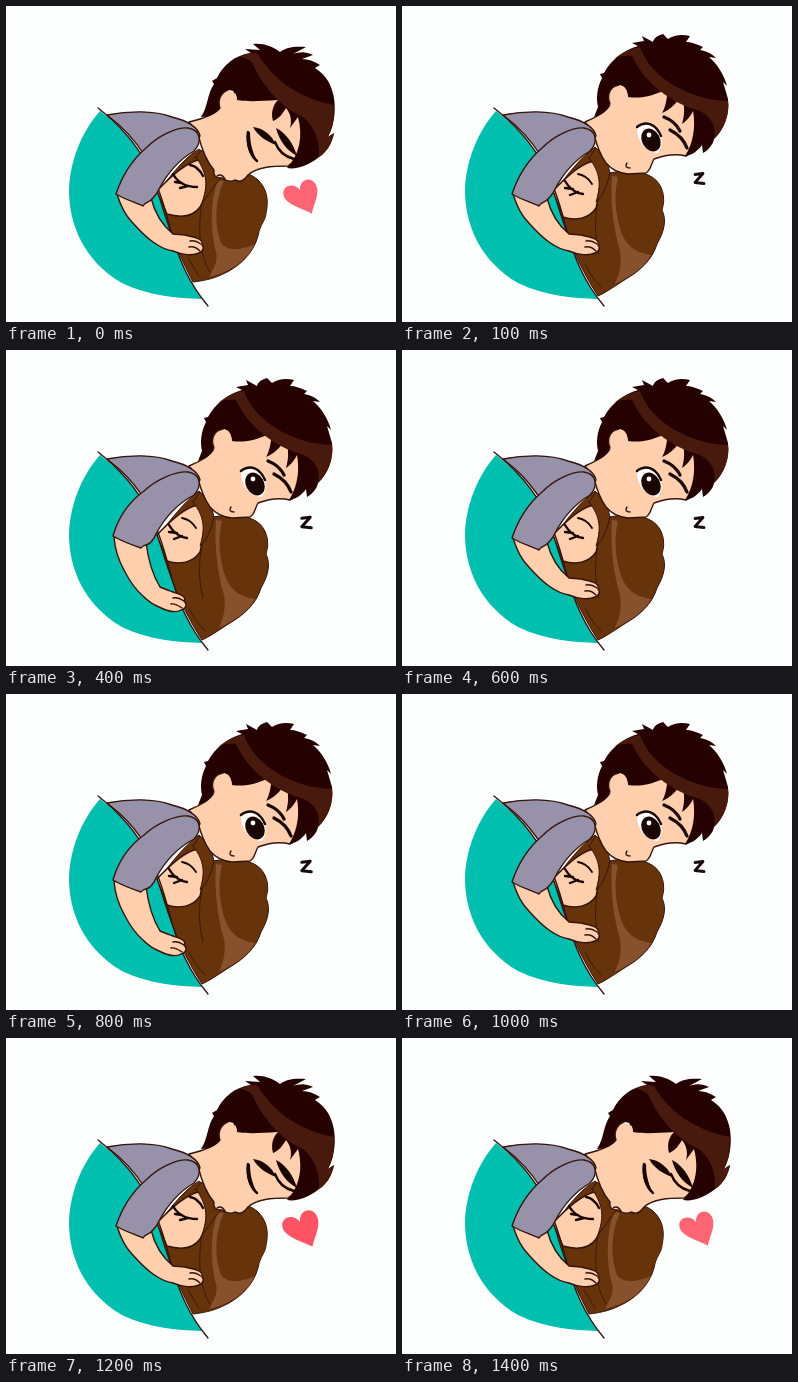
Recreate the animation shown at these times as an HTML page. Size 390x316 px, loop 1500 ms.

```html
<!DOCTYPE html>
<html lang="en">
<head>
<meta charset="utf-8">
<title>Sleepy hug</title>
<style>
html, body { margin: 0; width: 100%; height: 100%; overflow: hidden; background: #fdfefe; }
svg { display: block; width: 390px; height: 316px; }
path { stroke-linejoin: round; stroke-linecap: round; }
.line { fill: none; stroke: #35140c; stroke-width: 1.4; }
.skin { fill: #ffcfae; stroke: #35140c; stroke-width: 1.4; }
.flesh { fill: #ffcfae; }
.shirt { fill: #9792aa; stroke: #35140c; stroke-width: 1.4; }
.hair { fill: #250101; }
.shine { fill: #481a0d; }
.brown { fill: #66330b; stroke: #35140c; stroke-width: 1; }
.streak { fill: #87512e; }
.ink { fill: #190605; }
.lash { fill: none; stroke: #190605; stroke-width: 2.4; }
</style>
</head>
<body>
<svg viewBox="0 0 390 316">
  <path fill="#00bfae" d="M94 105C76 125 63 156 63 187C64 229 87 261 116 277C143 290 170 292 196 293C180 268 172 250 163 218C152 175 138 138 94 105Z"/>

  <g id="girlRest">
    <path class="brown" d="M152 186C166 168 178 152 193 141C200 147 205 156 207 167C222 164 240 165 250 171C261 178 264 192 260 204C265 214 262 226 255 238C250 255 236 266 224 273C213 280 203 287 196 290C179 264 168 238 158 207Z"/>
    <path class="streak" d="M210 170C208 198 212 225 218 245C220 256 218 267 213 278L226 271C236 265 244 258 249 249C234 247 223 240 218 222C213 205 212 188 216 171Z"/>
    <path class="brown" style="stroke:none" d="M217 172C212 190 214 212 220 227C226 242 238 246 250 245C261 230 264 214 260 204C264 190 259 177 249 171Z"/>
    <path class="line" style="stroke-width:.8" d="M183 258C188 268 193 275 199 281M196 195C192 215 193 232 197 248"/>
    <path class="skin" d="M151 185C164 171 176 160 188 156C196 155 200 158 202 164C197 177 197 190 194 202C187 213 173 215 161 211Z"/>
    <path class="brown" d="M187 152L194 142C201 148 206 157 208 167C205 180 201 190 194 196C199 180 199 167 187 152Z"/>
    <path class="lash" d="M163 175C168 184 174 187 181 188M163 182L171 183M168 189L176 186"/>
    <path class="lash" style="stroke-width:1.9" d="M176 168C182 169 187 173 190 178"/>
  </g>
  <g id="girlKiss">
    <path class="brown" d="M152 186C166 168 178 152 193 143C200 148 206 158 210 168C226 163 241 165 251 173C261 182 263 194 260 207C260 214 254 218 252 230C247 249 231 262 217 268C207 273 196 275 187 276C176 255 166 232 158 207Z"/>
    <path class="streak" d="M212 174C204 195 204 224 210 246C212 253 209 261 203 271L216 267C233 260 242 251 249 238C233 245 221 245 215 237C208 218 209 196 218 175Z"/>
    <path class="brown" style="stroke:none" d="M218 175C209 195 209 215 215 233C222 243 238 242 250 234C254 218 260 214 260 207C262 194 260 182 250 174Z"/>
    <path class="line" style="stroke-width:.8" d="M196 197C191 224 194 251 204 266M182 252L193 270"/>
    <path class="skin" d="M151 185C164 171 178 158 192 154C203 158 210 166 209 174C203 182 199 191 194 201C187 211 175 212 161 208Z"/>
    <path class="brown" d="M190 151L195 144C204 152 211 163 214 173C207 181 202 190 196 197C201 181 203 170 190 151Z"/>
    <path class="lash" d="M167 168C172 177 180 181 191 181M169 176L176 177M174 182L182 180M184 159C190 160 194 164 197 170"/>
  </g>

  <g id="headRest">
    <path class="skin" d="M183 116C198 110 206 103 209 98L222 76C250 58 290 75 301 110C299 132 294 145 284 150C272 147 260 150 252 153C249 158 249 164 244 167L226 168C216 167 209 163 204 157C199 150 195 141 192 128Z"/>
    <path class="hair" d="M192 111C201 109 206 104 208 98C204 88 209 80 217 79C223 79 225 84 226 91C238 93 253 90 266 82C265 91 264 101 260 107C269 103 275 97 279 89C283 98 283 108 280 118C286 114 289 109 291 105C294 121 291 138 283 150C290 149 296 145 300 139L301 147C307 144 311 138 312 133C322 124 328 108 326 93L321 76L325 80C322 68 315 58 307 51L314 52C309 47 304 45 298 44L301 41C295 38 289 36 284 36L288 30C280 28 272 29 266 33L261 28C255 30 252 32 251 36L240 30L242 35L230 37L236 40C222 44 209 54 202 67L198 68L200 72C195 82 194 92 196 101Z"/>
    <path class="shine" d="M212 53C221 46 230 42 238 41C248 70 285 94 326 95C328 108 322 124 312 133C315 120 309 111 298 105C268 97 242 76 230 50C224 49 217 50 212 53Z"/>
    <path class="flesh" d="M208 99C205 88 210 80 217 79C223 80 226 85 226 92L222 109L209 109Z"/>
    <path class="line" d="M208 98C204 88 209 80 217 79"/>
    <path fill="#fff" d="M235 122C240 116 249 116 255 122C261 130 261 141 256 147C246 147 235 137 235 122Z"/>
    <ellipse class="ink" cx="249" cy="134" rx="9" ry="12" transform="rotate(-28 249 134)"/>
    <circle cx="247" cy="129" r="2.4" fill="#fff"/>
    <path class="lash" d="M235 121C244 114 254 118 259 130"/>
    <path class="lash" style="stroke-width:3.2" d="M262 111C270 114 275 119 278 125M268 124C276 128 282 134 285 142"/>
    <path class="line" d="M225 157C223 160 224 162 228 162"/>
  </g>

  <g id="headKiss">
    <path class="skin" d="M183 116C200 112 210 107 214 102L229 86C258 77 288 91 300 119C303 139 296 151 282 160C266 160 251 161 242 169C238 174 235 177 229 174C224 177 219 174 216 172C209 172 207 169 208 164C201 156 196 145 192 128Z"/>
    <path class="hair" d="M195 111C204 111 211 107 214 102C211 93 216 86 222 84C229 84 231 89 231 94C242 96 255 95 272 94C266 100 265 108 267 115C273 113 277 107 280 102C285 108 286 115 284 122L292 111C297 130 294 148 281 162C291 164 305 158 313 151C321 146 326 137 328 127L322 131C329 119 331 98 326 84C323 74 317 67 309 62L314 59C308 55 302 53 296 53L307 49C299 45 293 46 287 48L300 41C289 40 280 41 274 46C266 40 257 37 247 38L254 44L239 43L245 47C229 49 217 59 211 72L206 75L208 78C201 88 202 101 195 111Z"/>
    <path class="shine" d="M234 51C240 47 247 46 252 48C266 73 294 93 328 99L327 118L322 131L328 127C326 137 321 146 313 151C314 135 309 121 297 111C276 102 256 80 246 56C242 53 238 51 234 51Z"/>
    <path class="flesh" d="M214 102C211 93 216 86 222 85C229 85 231 90 231 96L229 111L215 112Z"/>
    <path class="line" d="M214 102C211 93 216 86 222 84"/>
    <path class="ink" d="M241 125C239 138 243 150 252 156C247 148 244 138 244 126Z"/>
    <path class="lash" d="M242 126C241 138 244 149 251 155"/>
    <path class="ink" d="M247 121C257 122 266 129 270 139C260 135 252 130 247 121ZM270 122C280 127 287 137 291 150C280 144 273 134 270 122Z"/>
    <path class="lash" d="M269 136C273 147 280 151 288 153"/>
    <path class="line" d="M211 170C214 168 217 169 219 173"/>
  </g>

  <path class="shirt" d="M101 109C122 105 148 104 166 111C182 115 192 121 194 130L174 153L139 150C129 134 117 121 101 109Z"/>
  <path class="line" d="M92 102C138 138 152 175 163 218C172 252 182 276 202 300"/>
  <path id="arm" class="skin"/>
  <path id="fingers" class="line"/>
  <path id="sleeve" class="shirt"/>

  <path id="zed" fill="none" stroke="#160b0d" stroke-width="2.8" d="M-4 -4L4 -5L-4 4L5 5"/>
  <path id="heart" d="M11 18C3 13 -17 9 -18 -2C-19 -11 -7 -14 -1 -6C-2 -17 10 -21 15 -12C20 -3 13 8 11 18Z"/>
</svg>
<script>
const el = id => document.getElementById(id);
const show = (id, on) => el(id).setAttribute('display', on ? 'inline' : 'none');

// Blend two paths that share the same commands.
function blend(a, b, k) {
  const to = b.match(/-?[\d.]+/g);
  let i = 0;
  return a.replace(/-?[\d.]+/g, n => (+n + (to[i++] - n) * k).toFixed(2));
}

const limbs = {
  arm: [
    'M111 188C115 201 119 209 126 216C133 224 140 231 147 236C154 241 160 244 167 245C176 249 187 250 193 247C198 245 198 241 196 239C198 234 190 231 183 230C177 228 172 229 167 228C156 219 149 208 145 192Z',
    'M108 187C109 200 113 211 118 220C124 232 130 240 137 246C143 252 148 255 153 257C161 261 170 263 175 260C181 258 181 254 178 251C181 247 174 244 167 242C162 240 158 239 154 237C146 224 142 209 140 192Z'
  ],
  fingers: [
    'M184 235C188 234 192 236 195 238M183 241C187 240 191 242 194 245',
    'M167 248C171 247 175 249 178 251M165 254C169 253 173 256 176 258'
  ],
  sleeve: [
    'M110 188C116 170 126 154 140 142C152 130 170 121 182 122C194 124 197 135 188 145C171 155 161 168 153 183C151 188 149 190 147 192C143 197 139 196 137 200C128 196 118 193 110 188Z',
    'M107 186C112 168 123 152 138 141C151 129 170 121 182 122C194 124 197 135 188 145C169 155 158 169 150 184C148 189 147 190 145 192C142 196 137 194 135 198C126 195 115 191 107 186Z'
  ]
};

function draw(ms) {
  const t = Math.floor(ms / 100) * 100 % 1500;
  const kiss = t < 100 || t >= 1200;
  const pat = t >= 200 && t <= 1000 ? (1 - Math.cos((t - 200) / 200 * Math.PI)) / 2 : 0;

  for (const id in limbs) el(id).setAttribute('d', blend(...limbs[id], pat));
  for (const id of ['headKiss', 'girlKiss', 'heart']) show(id, kiss);
  for (const id of ['headRest', 'girlRest', 'zed']) show(id, !kiss);

  // A short lift of the head before the kiss.
  const lift = t === 1100 ? -11 : 0;
  el('headRest').setAttribute('transform', `translate(0 ${lift})`);
  el('zed').setAttribute('transform', `translate(${297 + 3 * pat} 172.5) scale(${1 + 0.06 * pat})`);

  const beat = t === 1200 ? 1 : t === 1300 ? 0.5 : 0;
  el('heart').setAttribute('transform', `translate(295 190) scale(${0.98 + 0.06 * beat})`);
  el('heart').setAttribute('fill', `rgb(253 ${100 - 16 * beat} ${116 - 16 * beat})`);
}

const start = performance.now();
function tick() {
  draw(performance.now() - start);
  requestAnimationFrame(tick);
}
draw(0);
requestAnimationFrame(tick);
</script>
</body>
</html>
```
